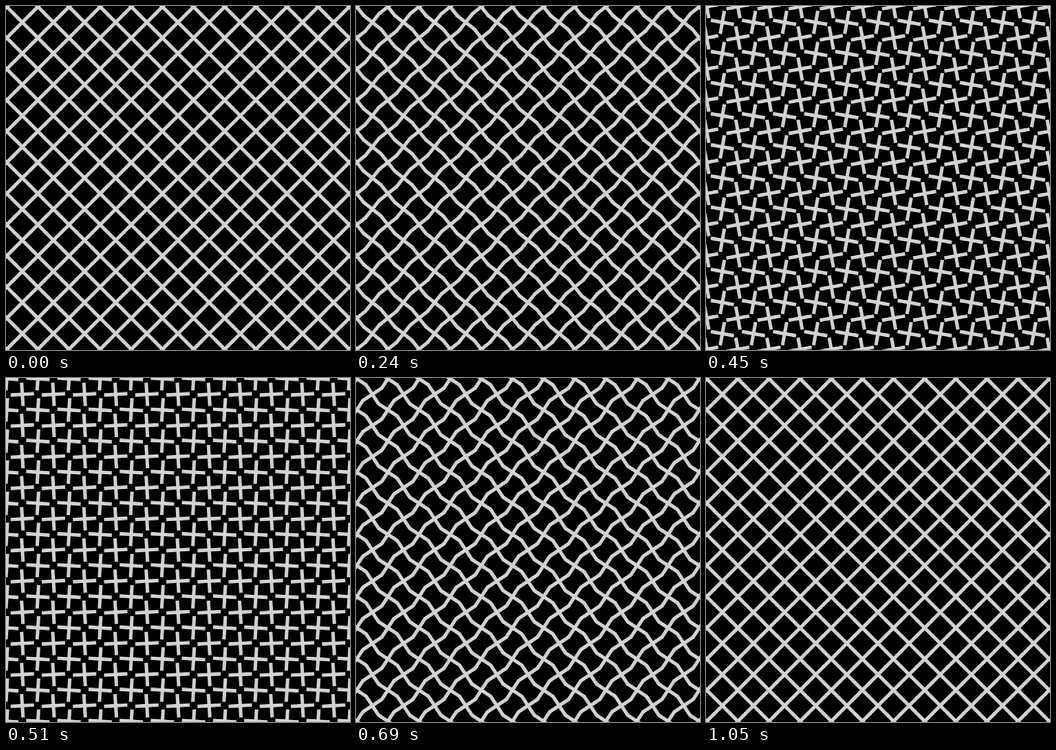
Animation, 500 px wide and 500 px high, one loop 1.08 s. Source, as an HTML page with a canvas:

```html
<!DOCTYPE html>
<html lang="en">
<head>
<meta charset="utf-8">
<title>Turning crosses</title>
<style>
  html, body { margin: 0; width: 100%; height: 100%; overflow: hidden; background: #000; }
  canvas { display: block; width: 500px; height: 500px; }
</style>
</head>
<body>
<canvas id="stage" width="500" height="500"></canvas>
<script>
  const SIZE = 500;
  const LOOP = 1080;
  const STEP = 30;
  const LEAD = 45;                  // the turn starts slightly before the loop point
  const HALF = 16 * Math.SQRT2;     // half the spacing of crosses within a row
  const ARM = 17;
  const WEIGHT = 5;
  const REACH = 12;
  const ctx = document.getElementById('stage').getContext('2d');

  const ease = p => p < 0.5 ? 4 * p ** 3 : 1 - 4 * (1 - p) ** 3;

  function drawCross(x, y, angle) {
    ctx.save();
    ctx.translate(x, y);
    ctx.rotate(angle);
    ctx.fillRect(-ARM, -WEIGHT / 2, ARM * 2, WEIGHT);
    ctx.fillRect(-WEIGHT / 2, -ARM, WEIGHT, ARM * 2);
    ctx.restore();
  }

  function draw(time) {
    const t = Math.floor((time % LOOP) / STEP) * STEP;
    const turn = ease(((t + LEAD) % LOOP) / LOOP) * Math.PI / 2;

    ctx.fillStyle = '#000';
    ctx.fillRect(0, 0, SIZE, SIZE);

    // Neighbouring rows turn in opposite directions.
    ctx.fillStyle = '#fff';
    for (let row = -REACH; row <= REACH; row++) {
      const odd = Math.abs(row % 2);
      const angle = Math.PI / 4 + (odd ? turn : -turn);
      for (let col = -REACH; col <= REACH; col++) {
        if (Math.abs(col % 2) !== odd) continue;
        drawCross(SIZE / 2 + col * HALF, SIZE / 2 + row * HALF, angle);
      }
    }

    // Fixed scan lines.
    ctx.fillStyle = 'rgba(0, 0, 0, 0.35)';
    for (let y = 1; y < SIZE; y += 2) ctx.fillRect(0, y, SIZE, 1);
  }

  const start = performance.now();
  function tick() {
    draw(performance.now() - start);
    requestAnimationFrame(tick);
  }
  tick();
</script>
</body>
</html>
```
